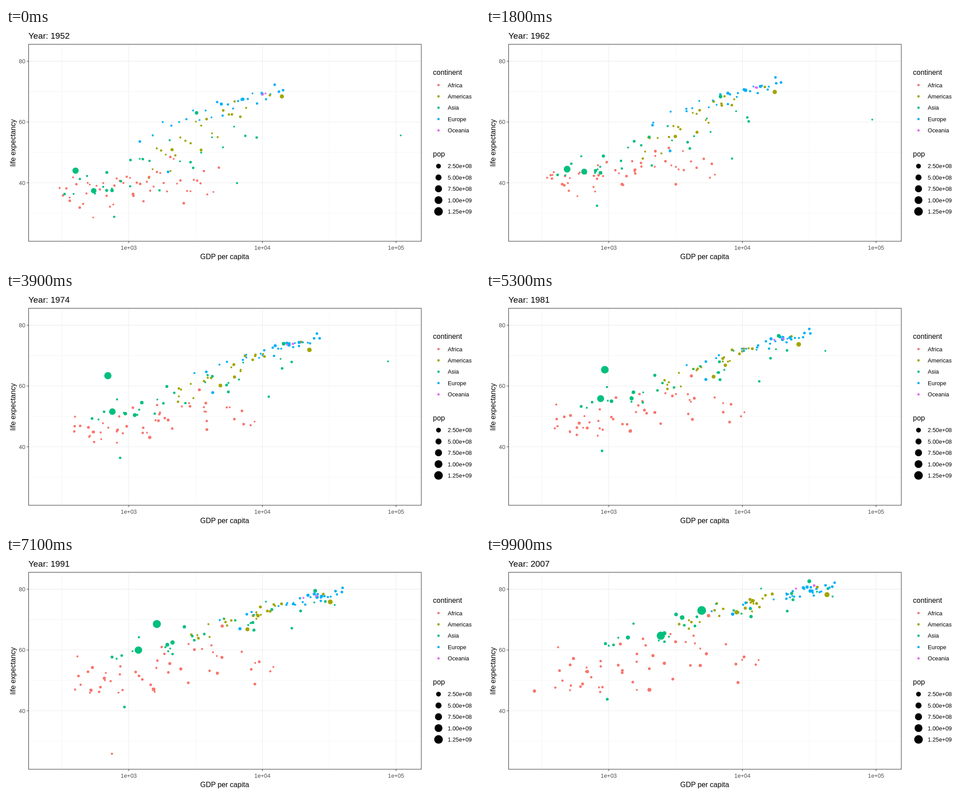
An HTML page for the animation above (10000 ms loop, 1058 px wide and 529 px high).

```html
<!DOCTYPE html>
<html lang="en">
<head>
<meta charset="utf-8">
<title>Life expectancy and GDP</title>
<style>
  html, body { margin: 0; width: 100%; height: 100%; overflow: hidden; background: #fff; }
  svg { display: block; width: 1058px; height: 529px; }
  text { font-family: "Liberation Sans", Arial, sans-serif; font-size: 12.8px; }
  .heading { font-size: 19.2px; }
  .title { font-size: 16px; }
  .tick { fill: #4d4d4d; }
  .middle { text-anchor: middle; }
  .end { text-anchor: end; }
</style>
</head>
<body>
<svg id="chart" viewBox="0 0 1058 529"></svg>
<script>
const STEP_MS = 100, STEPS = 100, FIRST_YEAR = 1952, LAST_YEAR = 2007;
const PANEL = { left: 50.5, top: 36.5, right: 927, bottom: 478 };
const chart = document.getElementById('chart');

const xOf = logGdp => 274 + 298.3 * (logGdp - 3);
const yOf = life => 347 - 6.815 * (life - 40);
const radius = millions => 1.9 + 7.9 * Math.sqrt(millions / 1320);
const mix = (a, b, t) => a + (b - a) * t;

// pace: how strongly log GDP and life expectancy slow down over the years.
// gdp / life ranges: [low, high, skew] and [base, slope, spread].
const REGIONS = {
  Africa: {
    color: '#F8766D', pace: [2, 1.7], crowd: 45, growth: 2.8,
    from: { gdp: [2.47, 3.6, 1], life: [36, 6, 9] },
    to: { gdp: [2.6, 4.1, 1.4], life: [51, 10, 12] }
  },
  Americas: {
    color: '#A3A500', pace: [1.25, 1.3], crowd: 20, growth: 2.3,
    from: { gdp: [3.14, 3.9, 1.15], life: [45, 20, 7] },
    to: { gdp: [3.42, 4.27, 0.85], life: [68, 9, 4] }
  },
  Asia: {
    color: '#00BF7D', pace: [1.2, 1.4], crowd: 20, growth: 2.4,
    from: { gdp: [2.57, 4, 1.2], life: [37, 20, 10] },
    to: { gdp: [3, 4.67, 1.25], life: [62, 19, 6] }
  },
  Europe: {
    color: '#00B0F6', pace: [1.5, 1.4], crowd: 25, growth: 1.25,
    from: { gdp: [2.99, 4.17, 0.65], life: [53.5, 18, 3] },
    to: { gdp: [3.77, 4.69, 0.5], life: [72.8, 8, 2] }
  },
  Oceania: { color: '#E76BF3', pace: [1.1, 1], crowd: 0 }
};

// Larger dots: region, population in millions, [GDP, life] at both ends.
const TRIPS = [
  ['Africa', 22, 80, [1419, 41.9], [5581, 71.3]],
  ['Africa', 21, 77, [362, 34.1], [691, 52.9]],
  ['Africa', 14, 44, [4725, 45], [9270, 49.3]],
  ['Africa', 0.4, 1.5, [4293, 37], [13206, 56.7]],
  ['Americas', 30, 109, [3478, 50.8], [11978, 76.2]],
  ['Americas', 18, 40, [5911, 62.5], [12779, 75.3]],
  ['Americas', 15, 33, [11367, 68.8], [36319, 80.7]],
  ['Asia', 41, 169, [685, 43.4], [2606, 65.5]],
  ['Asia', 47, 150, [684, 37.5], [1391, 64.1]],
  ['Asia', 22, 91, [1273, 47.8], [3190, 71.7]],
  ['Asia', 17, 69, [3035, 44.9], [11606, 71]],
  ['Asia', 21, 49, [1031, 47.5], [23348, 78.6]],
  ['Asia', 20, 48, [331, 36.3], [944, 62.1]],
  ['Asia', 8, 32, [779, 28.8], [975, 43.8]],
  ['Asia', 4, 28, [6460, 39.9], [21655, 72.8]],
  ['Europe', 69, 82, [7144, 67.5], [32170, 79.4]],
  ['Europe', 50, 61, [9980, 69.2], [33203, 79.4]],
  ['Europe', 42, 61, [7030, 67.4], [30470, 80.7]],
  ['Europe', 48, 58, [4931, 65.9], [28570, 80.5]],
  ['Europe', 22, 71, [1969, 43.6], [8458, 71.8]],
  ['Oceania', 8.7, 20, [10040, 69.1], [34435, 81.2]],
  ['Oceania', 2, 4.1, [10557, 69.4], [25185, 80.2]]
];

// Dots with an eventful path: [GDP, life] at evenly spaced years.
const HISTORIES = [
  ['Africa', 2.5, 8.9, [493, 40], [540, 41.5], [597, 43], [511, 44.1], [591, 44.6], [670, 45],
    [882, 46.2], [848, 44], [737, 23.6], [590, 36.1], [786, 43.4], [863, 46.2]],
  ['Africa', 14, 65, [781, 39.1], [890, 45.3], [585, 46.8], [278, 46.5]],
  ['Africa', 33, 135, [1077, 36.3], [1430, 42.2], [1460, 47.1], [2014, 46.9]],
  ['Americas', 57, 190, [2109, 50.9], [4400, 58.9], [7510, 65.8], [9066, 72.4]],
  ['Americas', 157, 301, [13990, 68.4], [21000, 71.1], [30600, 75.4], [42952, 78.2]],
  ['Asia', 0.2, 2.5, [108382, 55.6], [92350, 61.3], [87000, 68.3], [29400, 73.1], [39100, 76], [47307, 77.6]],
  ['Asia', 86, 127, [3217, 63], [12900, 72.8], [23780, 78.9], [31656, 82.6]],
  ['Asia', 82, 224, [750, 37.5], [980, 48.1], [1940, 61], [3541, 70.7]],
  ['Asia', 372, 1110, [547, 37.4], [667, 44.3], [757, 51.8], [929, 57.8], [1400, 61.5], [2452, 64.7]],
  ['Asia', 556, 1319, [400, 44], [576, 50.5], [488, 44.5], [613, 58.4], [677, 63.1], [741, 64],
    [962, 65.5], [1379, 67.3], [1656, 68.7], [2289, 70.4], [3119, 72], [4959, 73]]
];

let seed = 1952;
function random() {
  seed = (seed * 1664525 + 1013904223) % 4294967296;
  return seed / 4294967296;
}
const bell = () => random() + random() - 1;

function add(tag, attrs, text) {
  const node = document.createElementNS('http://www.w3.org/2000/svg', tag);
  for (const key in attrs) node.setAttribute(key, attrs[key]);
  if (text) node.textContent = text;
  return chart.appendChild(node);
}
const label = (x, y, text, style = '') => add('text', { x, y, class: style }, text);
const line = (x1, y1, x2, y2, stroke, width) =>
  add('line', { x1, y1, x2, y2, stroke, 'stroke-width': width });
const circle = (cx, cy, r, fill) => add('circle', { cx, cy, r, fill });

function drawGrid() {
  const { left, top, right, bottom } = PANEL;
  const column = (log, width) => line(xOf(log), top, xOf(log), bottom, '#ebebeb', width);
  const row = (life, width) => line(left, yOf(life), right, yOf(life), '#ebebeb', width);
  [2.5, 3.5, 4.5].forEach(log => column(log, 0.55));
  [30, 50, 70].forEach(life => row(life, 0.55));
  [3, 4, 5].forEach(log => column(log, 1.07));
  [40, 60, 80].forEach(life => row(life, 1.07));
}

function drawAxes() {
  const { left, top, right, bottom } = PANEL;
  add('rect', {
    x: left, y: top, width: right - left, height: bottom - top,
    fill: 'none', stroke: '#333', 'stroke-width': 1.07
  });
  [3, 4, 5].forEach(log => {
    line(xOf(log), bottom, xOf(log), bottom + 4, '#333', 1.07);
    label(xOf(log), 497, '1e+0' + log, 'tick middle');
  });
  [40, 60, 80].forEach(life => {
    line(left - 4, yOf(life), left, yOf(life), '#333', 1.07);
    label(43, yOf(life) + 4.7, String(life), 'tick end');
  });
  label(488, 518, 'GDP per capita', 'title middle');
  label(0, 0, 'life expectancy', 'title middle').setAttribute('transform', 'translate(20.5 257.5) rotate(-90)');
}

function drawLegend() {
  label(953, 105, 'continent', 'title');
  Object.entries(REGIONS).forEach(([name, { color }], i) => {
    const y = 127.8 + 25.4 * i;
    circle(965.4, y, 2.6, color);
    label(986, y + 4.7, name);
  });
  label(953, 288, 'pop', 'title');
  ['2.50e+08', '5.00e+08', '7.50e+08', '1.00e+09', '1.25e+09'].forEach((text, i) => {
    const y = 309.6 + 25.4 * i;
    circle(965.4, y, radius(Number(text) / 1e6), '#000');
    label(986, y + 4.7, text);
  });
}

// Picks a point on a region's cloud for a rank between 0 and 1.
function cloudPoint({ gdp: [low, high, skew], life: [base, slope, spread] }, rank) {
  const along = rank ** skew;
  return [mix(low, high, along), base + slope * along + spread * bell()];
}

function makeCrowd(region) {
  return Array.from({ length: region.crowd }, (_, i) => {
    const rank = (i + 0.5) / region.crowd;
    const endRank = Math.min(1, Math.max(0, rank + 0.25 * bell()));
    const size = 0.4 + 22 * random() ** 2;
    return {
      region, sizes: [size, size * region.growth], eased: true,
      points: [cloudPoint(region.from, rank), cloudPoint(region.to, endRank)]
    };
  });
}

const makeTracked = eased => ([name, size0, size1, ...points]) => ({
  region: REGIONS[name], sizes: [size0, size1], eased,
  points: points.map(([gdp, life]) => [Math.log10(gdp), life])
});

function place({ node, region, points, sizes, eased }, t) {
  const at = axis => {
    const progress = eased ? 1 - (1 - t) ** region.pace[axis] : t;
    const position = progress * (points.length - 1);
    const i = Math.min(Math.floor(position), points.length - 2);
    return mix(points[i][axis], points[i + 1][axis], position - i);
  };
  node.setAttribute('cx', xOf(at(0)).toFixed(2));
  node.setAttribute('cy', yOf(at(1)).toFixed(2));
  node.setAttribute('r', mix(radius(sizes[0]), radius(sizes[1]), t).toFixed(2));
}

drawGrid();
const dots = [
  ...Object.values(REGIONS).flatMap(makeCrowd),
  ...TRIPS.map(makeTracked(true)),
  ...HISTORIES.map(makeTracked(false))
];
dots.forEach(dot => { dot.node = circle(0, 0, 0, dot.region.color); });
drawAxes();
drawLegend();
const heading = label(50, 24, 'Year: ' + FIRST_YEAR, 'heading');

let shown = -1;
function render() {
  const step = Math.floor(performance.now() / STEP_MS) % STEPS;
  if (step !== shown) {
    shown = step;
    const t = step / (STEPS - 1);
    heading.textContent = 'Year: ' + Math.round(mix(FIRST_YEAR, LAST_YEAR, t));
    dots.forEach(dot => place(dot, t));
  }
  requestAnimationFrame(render);
}
render();
</script>
</body>
</html>
```
